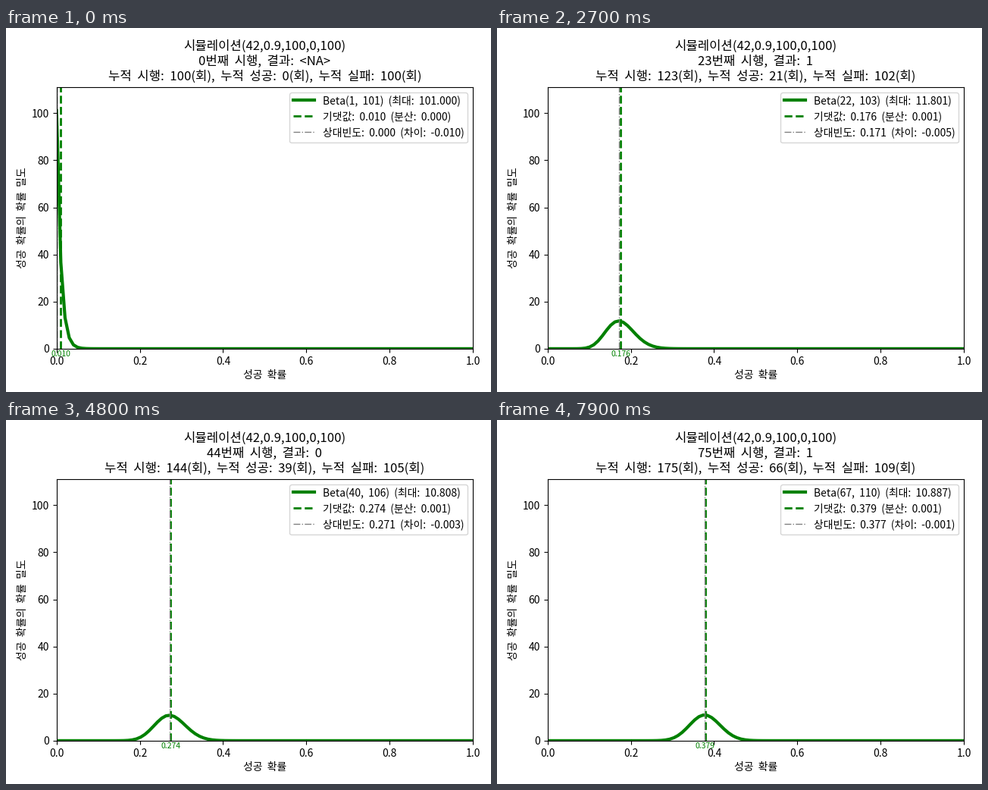
Recreate the animation shown at these times as a matplotlib script. Size 640 px wide and 480 px high, loop 8 s.

```python
import math

import matplotlib.pyplot as plt
import numpy as np
from matplotlib.animation import FuncAnimation
from matplotlib.lines import Line2D
from matplotlib.patches import FancyBboxPatch
from matplotlib.transforms import Affine2D

W, H, DPI = 640, 480, 100
LEFT, RIGHT, TOP, BOTTOM = 66.8, 616.0, 77.9, 422.9
MID = (LEFT + RIGHT) / 2
SEED, P, N0, WINS0, LOSSES0 = 42, 0.9, 100, 0, 100
HOLD, FRAMES = 5, 80

plt.rcParams["font.family"] = "Noto Sans CJK JP"
plt.rcParams["font.size"] = 10

np.random.seed(SEED)
results = (np.random.rand(FRAMES - HOLD) < P).astype(int)
wins = WINS0 + np.concatenate([[0], np.cumsum(results)])
xs = np.linspace(0, 1, 100)

fig = plt.figure(figsize=(W / DPI, H / DPI), dpi=DPI, facecolor="white")
ax = fig.add_axes([LEFT / W, 1 - BOTTOM / H, (RIGHT - LEFT) / W, (BOTTOM - TOP) / H])
ax.set_xlim(0, 1)
ax.set_ylim(0, 1.1 * (LOSSES0 + 1))

# pixel coordinates with the origin at the top left
px = Affine2D().scale(1, -1).translate(0, H)


def wide(text):
    """Word gaps as broad as Korean type expects."""
    return text.replace(" ", "  ")


def label(x, y, text="", size=10, ha="center", **kw):
    return fig.text(x, y, wide(text), fontsize=size, ha=ha, va="baseline",
                    transform=px, **kw)


def beta_pdf(a, b):
    log_c = math.lgamma(a + b) - math.lgamma(a) - math.lgamma(b)
    return math.exp(log_c) * xs ** (a - 1) * (1 - xs) ** (b - 1)


CURVE = dict(color="green", lw=3)
MEAN = dict(color="green", lw=2, ls="--")
FREQ = dict(color="gray", lw=1, ls="-.")

curve, = ax.plot([], [], **CURVE)
mean_line = ax.axvline(0, **MEAN)
freq_line = ax.axvline(0, **FREQ)
mean_text = label(LEFT, 433.4, size=7.5, color="green")

label(MID, 29, f"시뮬레이션({SEED},{P},{N0},{WINS0},{LOSSES0})", 12)
trial_text = label(MID, 49, size=12)
total_text = label(MID, 69, size=12)
label(MID, 462, "성공 확률")
label(26, 250.4, "성공 확률의 확률 밀도", rotation=90, rotation_mode="anchor")

# legend
fig.add_artist(FancyBboxPatch(
    (373.8, 84.9), 235.3, 66.5, boxstyle="round,pad=0,rounding_size=2.8",
    fc="white", ec="0.8", lw=1, alpha=0.8, snap=True, transform=px))
legend = []
for y, style in zip((95.4, 116.3, 137.2), (CURVE, MEAN, FREQ)):
    fig.add_artist(Line2D([379.3, 407.1], [y, y], transform=px, **style))
    legend.append(label(418.2, y + 4.9, ha="left"))


def update(i):
    k = max(0, i - HOLD + 1)
    n, s = N0 + k, int(wins[k])
    f = n - s
    a, b = s + 1, f + 1
    mean, freq = a / (a + b), s / n
    var = a * b / ((a + b) ** 2 * (a + b + 1))
    pdf = beta_pdf(a, b)
    result = results[k - 1] if k else "<NA>"

    curve.set_data(xs, pdf)
    mean_line.set_xdata([mean, mean])
    freq_line.set_xdata([freq, freq])
    mean_text.set_x(LEFT + (RIGHT - LEFT) * mean)
    mean_text.set_text(f"{mean:.3f}")
    trial_text.set_text(wide(f"{k}번째 시행, 결과: {result}"))
    total_text.set_text(wide(
        f"누적 시행: {n}(회), 누적 성공: {s}(회), 누적 실패: {f}(회)"))
    rows = (f"Beta({a}, {b}) (최대: {pdf.max():.3f})",
            f"기댓값: {mean:.3f} (분산: {var:.3f})",
            f"상대빈도: {freq:.3f} (차이: {freq - mean:.3f})")
    for text, row in zip(legend, rows):
        text.set_text(wide(row))
    return [curve, mean_line, freq_line, mean_text, trial_text, total_text, *legend]


anim = FuncAnimation(fig, update, frames=FRAMES, interval=100, repeat=True,
                     repeat_delay=0, blit=False)
plt.show()
```
